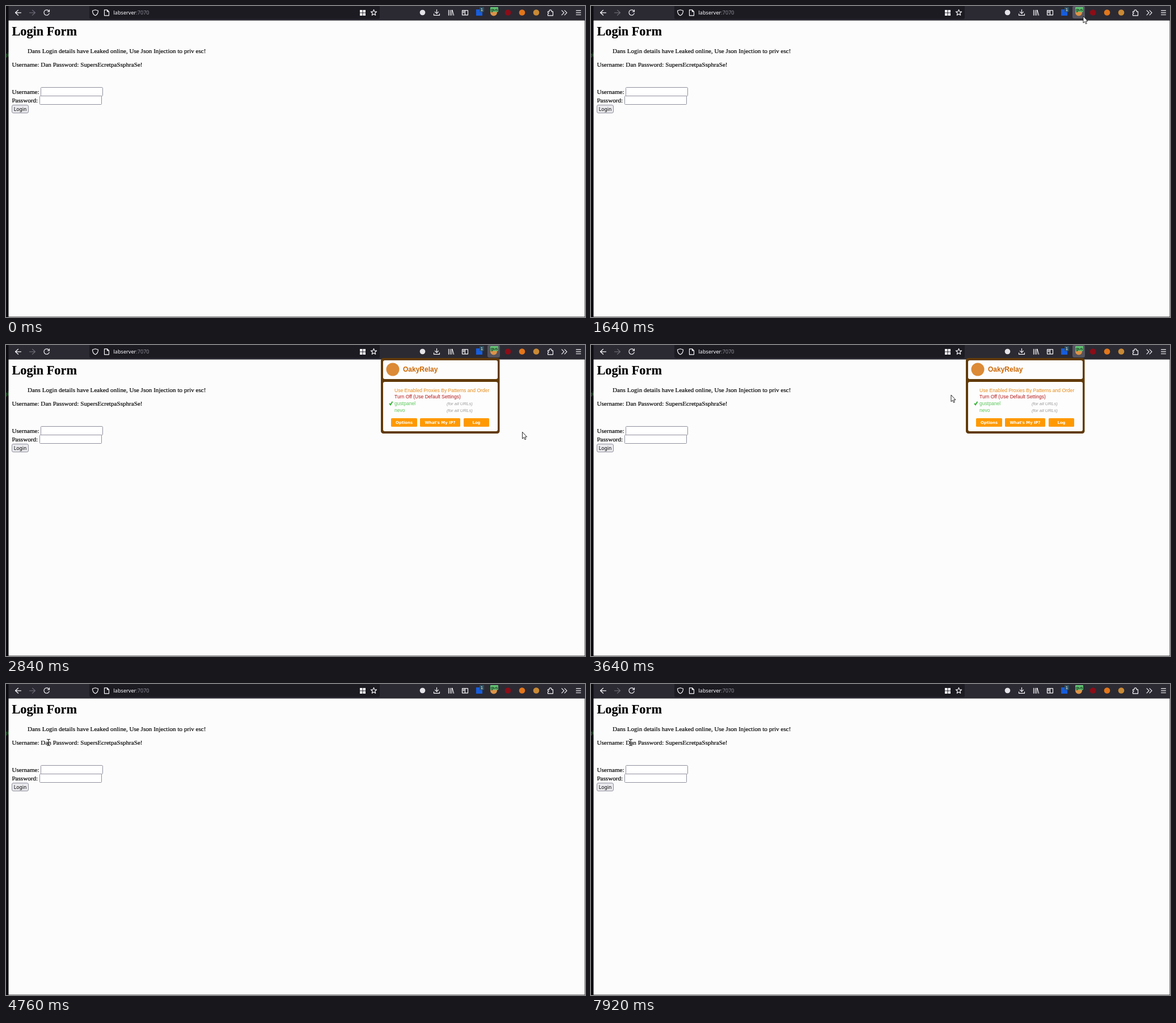
Animation, 1021 px wide and 548 px high, one loop 8 s. Source, as an HTML page:

```html
<!DOCTYPE html>
<html lang="en">
<head>
<meta charset="utf-8">
<title>Login form</title>
<style>
  html, body { margin: 0; width: 100%; height: 100%; overflow: hidden; background: #fcfcfc; }
  svg { display: block; width: 1021px; height: 548px; }
  .serif { font: 11.14px "Liberation Serif", serif; stroke: #000; stroke-width: .18; }
  .sans { font: 8.55px "Liberation Sans", sans-serif; }
  .ui { font: 9.1px "Noto Sans", sans-serif; }
  .icon { fill: none; stroke: #fbfbfe; stroke-width: 1.15; stroke-linecap: round; stroke-linejoin: round; }
  .field { fill: #fff; stroke: #8f8f9d; }
  .hint { font-size: 7.8px; font-style: italic; fill: #999; }
  .label { font: bold 6.85px "DejaVu Sans", sans-serif; fill: #fff; }
  .middle { text-anchor: middle; }
</style>
</head>
<body>
<svg viewBox="0 0 1021 548">
  <rect width="1021" height="548" fill="#0c0c10"/>
  <text class="ui" x="4.5" y="89" text-anchor="end" fill="#2f8f3a">gi</text>
  <rect x="4.5" y="25.5" width="1016" height="522" fill="#fcfcfc"/>
  <rect x="4.5" width="1016.5" height="25" fill="#2b2a33"/>
  <rect x="147" y="-4" width="512" height="27" rx="3" fill="#1c1b22"/>

  <g class="serif">
    <text x="10.4" y="52" font-size="22.3" font-weight="bold">Login Form</text>
    <text x="38" y="83">Dans Login details have Leaked online, Use Json Injection to priv esc!</text>
    <text x="10.4" y="106.5">Username: Dan Password: SupersEcretpaSsphraSe!</text>
    <text x="10.4" y="154.5">Username:</text>
    <text x="10.4" y="170">Password:</text>
  </g>
  <rect class="field" x="61.5" y="143.5" width="109" height="15" rx="1"/>
  <rect class="field" x="59.5" y="158.5" width="109" height="15" rx="1"/>
  <rect x="10.5" y="174.5" width="29" height="14" rx="2.5" fill="#e9e9ed" stroke="#8f8f9d"/>
  <text class="ui middle" x="25" y="185" style="font-size:8.5px">Login</text>

  <rect id="hover" x="849" width="22" height="22" rx="3" fill="#55545f"/>
  <text class="ui" x="189.5" y="15.2" fill="#fbfbfe">labserver<tspan fill="#8f8e98">:7070</tspan></text>
  <g id="toolbar"></g>

  <g id="menu" class="sans">
    <rect x="661" y="23" width="209.5" height="133" rx="4.5" fill="#613a08"/>
    <rect x="665" y="27" width="202" height="33" rx="3" fill="#fdfdfd"/>
    <rect x="665" y="65" width="202" height="87" rx="3" fill="#fdfdfd"/>
    <circle cx="682" cy="43" r="11.5" fill="#dc8a35"/>
    <text x="700" y="46.5" fill="#cc6600" font-weight="bold" style="font-size:12px">OakyRelay</text>
    <path d="M676 103l2 2.3 3.500-5.500" fill="none" stroke="#35b535" stroke-width="2"/>
  </g>

  <!-- pointers, hot spot at 0,0 -->
  <path id="arrow" d="M0 0V11.800L2.700 9.400L4.500 13.500L6.300 12.700L4.600 8.700H8Z" fill="#fff" stroke="#111" stroke-width=".9"/>
  <path id="beam" d="M-3-5.500h2l1 1 1-1h2M0-4.500v9M-3 5.500h2l1-1 1 1h2" fill="none" stroke="#222" stroke-width="1.1"/>
</svg>
<script>
const LOOP = 8000;
const $ = id => document.getElementById(id);
const toolbar = $("toolbar"), menu = $("menu"), hover = $("hover"), arrow = $("arrow"), beam = $("beam");

function add(parent, tag, attributes, text = "") {
  const node = document.createElementNS("http://www.w3.org/2000/svg", tag);
  for (const name in attributes) node.setAttribute(name, attributes[name]);
  node.textContent = text;
  parent.append(node);
}

// toolbar icons, drawn around their own centre
const icon = (x, d, stroke = "#fbfbfe") =>
  add(toolbar, "path", { class: "icon", d, stroke, transform: `translate(${x} 11.8)`, style: `stroke:${stroke}` });
const dot = (x, r, fill) => add(toolbar, "circle", { cx: x, cy: 11.5, r, fill });
const badge = (x, width, fill, ink, text) => {
  add(toolbar, "rect", { x: x - width / 2, y: 2, width, height: 8.5, rx: 1, fill });
  add(toolbar, "text", { class: "sans middle", x, y: 8.8, fill: ink, style: "font-size:7.8px" }, text);
};
const star = Array.from({ length: 10 }, (_, i) => {
  const r = i % 2 ? 2.4 : 5.4, a = i * Math.PI / 5;
  return [r * Math.sin(a), -r * Math.cos(a)];
});

icon(21.5, "M5 0H-5M0-4.500L-5 0L0 4.500");
icon(46.5, "M-5 0H5M0-4.500L5 0L0 4.500", "#6a6973");
icon(71.5, "M4-3A4.700 4.700 0 1 0 4.700 1M5-5v3.200h-3.200");
icon(157.5, "M0-5L5-3.500Q5 3 0 5Q-5 3-5-3.500Z");
icon(177.5, "M-4-5H1L4-2V5H-4ZM1-5V-2H4");
icon(648.5, `M${star.join("L")}Z`);
icon(759.5, "M0-5.500V1.500M-3-1.500L0 1.500L3-1.500M-5 2V4.500H5V2");
icon(785, "M-4.500-4.500V4.500M-1.700-4.500V4.500M1-4.500V4.500M2-4.500L4.500 4.500");
icon(809.5, "M-5-4H5V4H-5ZM0-4V4M-3.500-2h2M-3.500 0h2");
icon(960, "M-4.500-2H-2V-4Q0-6 2-4V-2H4.500V5H-4.500V2Q-1 1-4.500 0Z");
icon(984.5, "M-4.500-4l4 4-4 4M.5-4l4 4-4 4");
icon(1009.5, "M-4-3.700H4M-4 0H4M-4 3.700H4");
for (const x of [624, 629.5])
  for (const y of [7, 12.5]) add(toolbar, "rect", { x, y, width: 4.5, height: 4.5, fill: "#fbfbfe" });
dot(734.5, 4.8, "#e4e4e8");
add(toolbar, "rect", { x: 829, y: 6, width: 11, height: 11, fill: "#175ddc" });
badge(839, 8, "#2c4f60", "#fff", "1");
dot(860, 6, "#dc9348");
badge(861, 14, "#62c774", "#000", "gus");
["#8c0d17", "#e2761b", "#c98a35"].forEach((fill, i) => dot(885 + 25 * i, 5.3, fill));

// extension menu
[["Use Enabled Proxies By Patterns and Order", "#e68a17"], ["Turn Off (Use Default Settings)", "#b51a1a"],
 ["gustpanel", "#5cc85c"], ["nevo", "#5cc85c"]].forEach(([text, fill], i) => {
  const y = 82.5 + 11.7 * i;
  add(menu, "text", { x: 685, y, fill }, text);
  if (i > 1) add(menu, "text", { class: "hint", x: 777, y: y + .3 }, "(for all URLs)");
});
[["Options", 679, 46], ["What's My IP?", 730, 71], ["Log", 807, 45]].forEach(([text, x, width]) => {
  add(menu, "rect", { x, y: 129, width, height: 15, rx: 1.5, fill: "#ff9900" });
  add(menu, "text", { class: "label middle", x: x + width / 2, y: 139.3 }, text);
});

// turning points of the pointer: time, x, y
const path = [
  [700, 1010, 546], [1640, 868, 18], [2040, 862, 4], [2600, 862, 4], [2900, 916, 170],
  [3640, 635, 88], [4320, 308, 100], [4520, 20, 160], [4760, 75, 103], [5160, 35, 60],
  [6040, 295, 68], [6800, 78, 122], [7240, 78, 103], [7920, 70, 103]
];
const textBoxes = [...document.querySelectorAll(".serif text, .field")].map(node => node.getBBox());
const ramp = (t, from, to) => Math.min(1, Math.max(0, (t - from) / (to - from)));
const show = (node, on) => node.setAttribute("visibility", on ? "visible" : "hidden");
const inside = (x, y, box) => x >= box.x && x <= box.x + box.width && y >= box.y && y <= box.y + box.height;
const hoverBox = hover.getBBox();

function pointerAt(t) {
  let [, x, y] = path[0];
  for (let i = 1; i < path.length; i++) {
    const k = ramp(t, path[i - 1][0], path[i][0]), ease = k * k * (3 - 2 * k);
    x += (path[i][1] - path[i - 1][1]) * ease;
    y += (path[i][2] - path[i - 1][2]) * ease;
  }
  return [x, y];
}

function draw(t) {
  const [x, y] = pointerAt(t);
  const visible = t >= path[0][0];
  const onText = textBoxes.some(box => inside(x, y, box));
  const opacity = Math.min(ramp(t, 2200, 2360), 1 - ramp(t, 3760, 3880));
  menu.setAttribute("opacity", opacity);
  show(hover, opacity > 0 || inside(x, y, hoverBox));
  show(arrow, visible && !onText);
  show(beam, visible && onText);
  for (const node of [arrow, beam]) node.setAttribute("transform", `translate(${x} ${y})`);
}

const start = performance.now();
function tick() {
  draw((performance.now() - start) % LOOP);
  requestAnimationFrame(tick);
}
tick();
</script>
</body>
</html>
```
